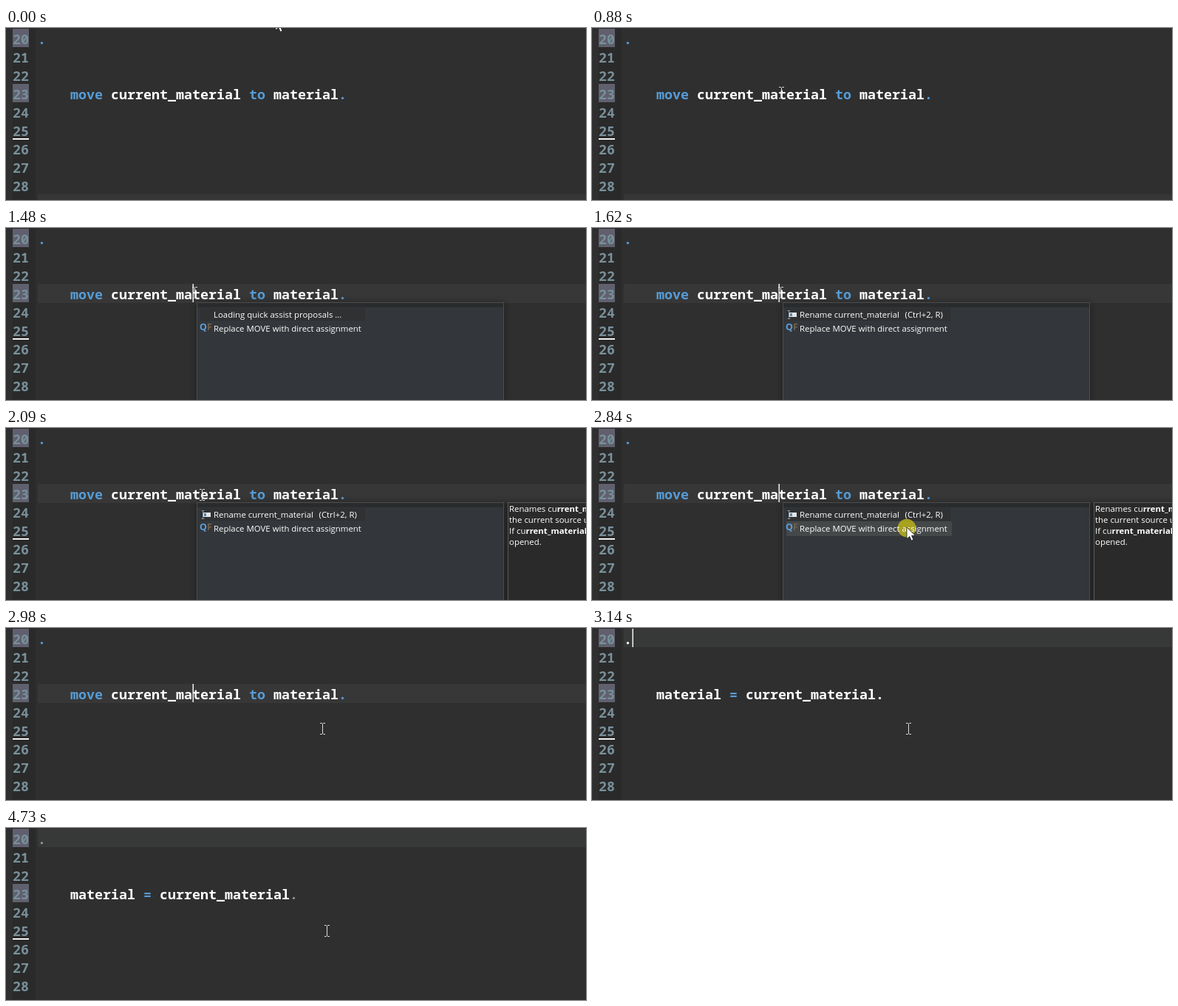
An HTML page that plays this animation: 785 px wide and 234 px high, repeating every 4.93 s.

```html
<!DOCTYPE html>
<html lang="en">
<head>
<meta charset="utf-8">
<title>Quick assist</title>
<style>
  html, body { margin: 0; width: 100%; height: 100%; overflow: hidden; background: #2f2f2f; }
  svg { display: block; width: 785px; height: 234px; }
  text { white-space: pre; }
  .code { font: 600 18.333px "Noto Sans Mono", "DejaVu Sans Mono", monospace; fill: #fff; }
  .num { fill: #78909a; }
  .key { fill: #569cd6; }
  .dim { fill: #8c9296; }
  .ui { font: 11.42px "Open Sans", "Noto Sans", sans-serif; fill: #fff; }
  .b { font-weight: 700; }
  .popup { filter: drop-shadow(0 0 5px rgba(0, 0, 0, .35)); }
</style>
</head>
<body>
<svg viewBox="0 0 785 234" xmlns="http://www.w3.org/2000/svg">
  <rect width="785" height="234" fill="#2f2f2f"/>
  <rect x="9" width="31" height="234" fill="#2a2a2a"/>
  <rect x="43" y="226" width="742" height="8" fill="#373637" data-on="0-1080"/>
  <rect x="43" y="76" width="742" height="26" fill="#373737" data-on="1080-3050"/>
  <rect x="43" y="1" width="742" height="25" fill="#373938" data-on="3140-4930"/>

  <g fill="#60606e">
    <rect x="9" y="1" width="22" height="25"/>
    <rect x="9" y="76" width="22" height="25"/>
  </g>
  <g id="numbers" class="code"></g>
  <rect x="9" y="150" width="22" height="2" fill="#f4f4f4"/>

  <g class="code">
    <text class="key" x="43" y="22" data-on="0-3050">.</text>
    <text x="43" y="22" data-on="3050-4130">.</text>
    <text class="dim" x="43" y="22" data-on="4130-4930">.</text>
    <text x="87" y="97" data-on="0-3050"><tspan class="key">move</tspan> current_material <tspan class="key">to</tspan> material<tspan class="key">.</tspan></text>
    <text x="87" y="97" data-on="3050-4930">material <tspan class="key">=</tspan> current_material</text>
    <text x="384" y="97" data-on="3050-4130">.</text>
    <text class="dim" x="384" y="97" data-on="4130-4930">.</text>
  </g>

  <g fill="#f0f0f0">
    <rect x="252.5" y="76" width="1.5" height="25" data-on="1080-1820 2360-3050"/>
    <rect x="54.5" y="1" width="1.5" height="25" data-on="3140-4730"/>
  </g>

  <g data-on="1480-2980">
    <rect class="popup" x="258.5" y="101.5" width="415" height="140" fill="#33373b" stroke="#4b4d4f"/>
    <rect x="259" y="102" width="414" height="6" fill="#292b2d"/>
    <rect x="263" y="109" width="223" height="17" fill="#2f3133"/>
    <rect x="263" y="127" width="224" height="20" fill="#454849" data-on="2500-2980"/>
    <circle cx="426" cy="136" r="12.3" fill="#c4bb16" fill-opacity=".78" data-on="2840-2910"/>
    <g class="ui">
      <text x="281" y="122" data-on="1480-1550">Loading quick assist proposals ...</text>
      <g data-on="1550-2980">
        <text x="281" y="122">Rename current_material</text>
        <text x="423.5" y="122">(Ctrl+2, R)</text>
        <rect x="267" y="115" width="10" height="6" fill="#e6e6e4"/>
        <rect x="268" y="116" width="3" height="4" fill="#5c86ad"/>
        <path d="M264.5 112.5h4M266.5 113v10M264.5 123.5h4" stroke="#8b9298" fill="none"/>
      </g>
      <text x="281" y="141">Replace MOVE with direct assignment</text>
      <text class="b" x="262" y="139" style="font-size:12.5px"><tspan fill="#5b9fd8">Q</tspan><tspan fill="#75604b">F</tspan></text>
    </g>
  </g>

  <g data-on="2090-2980">
    <rect class="popup" x="679.5" y="101.5" width="120" height="140" fill="#2a2a2a" stroke="#58595a"/>
    <g class="ui">
      <text x="681" y="114">Renames cu<tspan class="b">rrent_material</tspan></text>
      <text x="681" y="129">the current source unit</text>
      <text x="681" y="144">If cu<tspan class="b">rrent_material</tspan></text>
      <text x="681" y="159">opened.</text>
    </g>
  </g>

  <path id="arrow" d="M0 0V16L3.8 12.6 6.3 18.2 9 17 6.6 11.5H11.6Z" fill="#fff" stroke="#1b1b1b" stroke-width=".8"/>
  <path id="beam" d="M-3.5 -7.5H-1M1 -7.5H3.5M0 -7V7M-3.5 7.5H-1M1 7.5H3.5M-1 -7.5L0 -6.5 1 -7.5M-1 7.5L0 6.5 1 7.5" fill="none" stroke="#dedede"/>
</svg>
<script>
const LOOP = 4930;
const $ = id => document.getElementById(id);

for (let n = 20; n <= 28; n++) {
  const label = document.createElementNS("http://www.w3.org/2000/svg", "text");
  label.setAttribute("class", "num");
  label.setAttribute("x", 9);
  label.setAttribute("y", 22 + (n - 20) * 25);
  label.textContent = n;
  $("numbers").append(label);
}

// [time, shape, x, y]: arrow by its tip, beam by its centre
const pointer = [
  [0, "arrow", 365, -13],
  [330, "beam", 358, 10], [400, "beam", 330, 32], [470, "beam", 295, 57],
  [540, "beam", 270, 72], [610, "beam", 261, 77],
  [810, "beam", 259, 82], [880, "beam", 256, 88], [1010, "beam", 255, 88],
  [2090, "beam", 265, 91], [2160, "beam", 275, 83], [2230, "beam", 308, 74],
  [2300, "beam", 358, 82], [2360, "arrow", 395, 102], [2430, "arrow", 420, 119],
  [2500, "arrow", 428, 131], [2570, "arrow", 427, 134], [2640, "arrow", 426, 135],
  [2980, "beam", 428, 137], [3930, "beam", 434, 140]
];

const parts = [...document.querySelectorAll("[data-on]")].map(el => ({
  el, spans: el.dataset.on.split(" ").map(s => s.split("-").map(Number))
}));

function draw(t) {
  for (const { el, spans } of parts) {
    const on = spans.some(([from, to]) => t >= from && t < to);
    el.style.display = on ? "" : "none";
  }
  const [, shape, x, y] = pointer.findLast(step => t >= step[0]);
  for (const id of ["arrow", "beam"]) $(id).style.display = id === shape ? "" : "none";
  const half = shape === "beam" ? 0.5 : 0;
  $(shape).setAttribute("transform", `translate(${x + half} ${y})`);
}

const start = performance.now();
function tick() {
  draw((performance.now() - start) % LOOP);
  requestAnimationFrame(tick);
}
tick();
</script>
</body>
</html>
```
